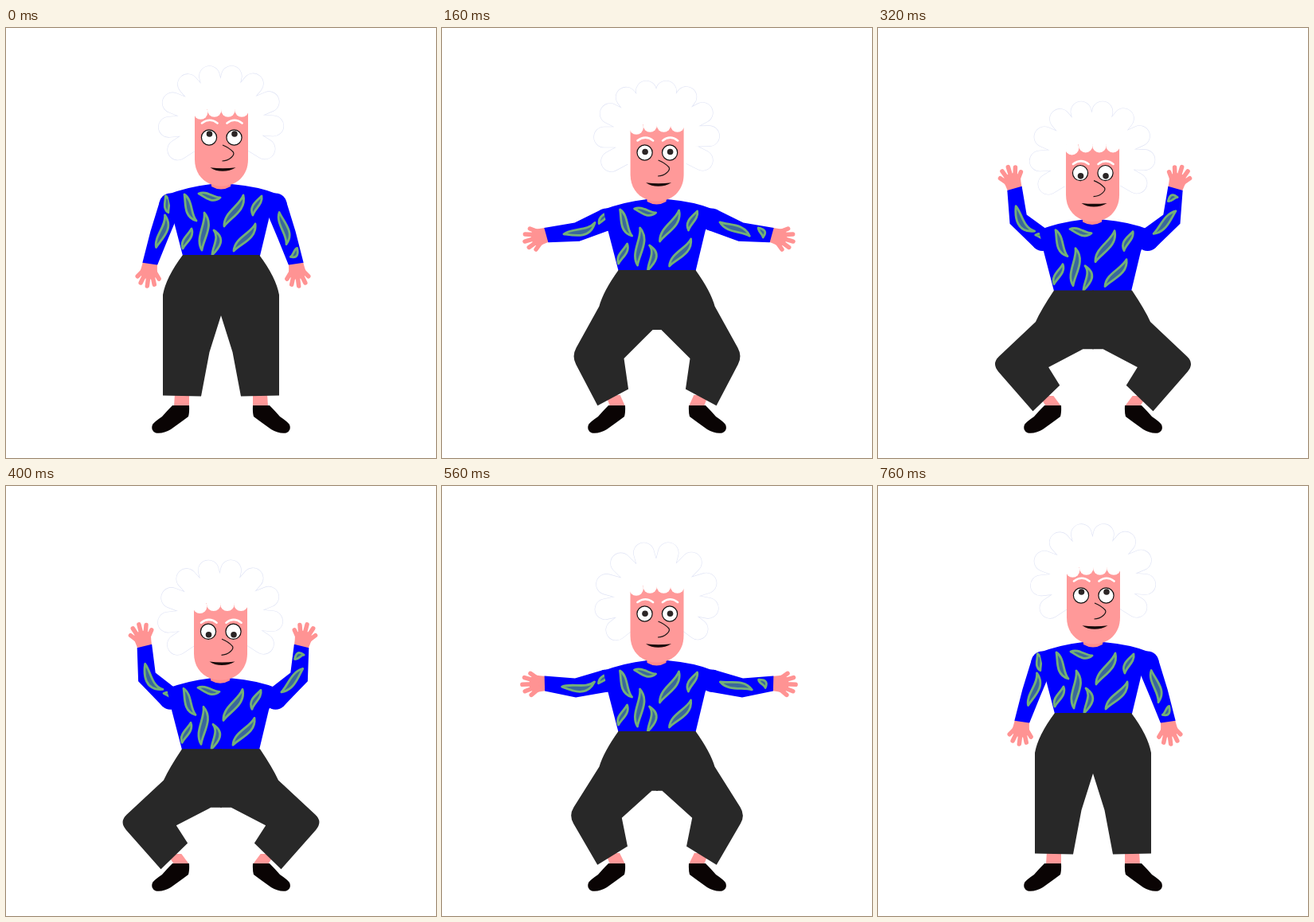
These frames come from a looping animation (540 px wide and 540 px high, 800 ms). An HTML page:

```html
<!DOCTYPE html>
<html lang="en">
<head>
<meta charset="utf-8">
<title>Squat dance</title>
<style>
html, body { margin: 0; width: 100%; height: 100%; overflow: hidden; background: #fff; }
svg { display: block; width: 100%; height: 100%; }
</style>
</head>
<body>
<svg id="stage" viewBox="0 0 540 540">
  <g id="hands" fill="#ff9393" stroke="#ff9393" stroke-linecap="round"></g>
  <g id="arms"></g>
  <g id="torso">
    <path fill="#00f" d="M222 286L209 236L203 209Q230 199 258 196H283Q318 199 342 209L331 236L319 286Z"/>
    <g id="print"></g>
  </g>
  <g id="leg">
    <path id="shin" fill="#ff9999"/>
    <path fill="#0a0404" d="M209 474H230Q230.500 483 229 488Q221 494 207 504Q197 510 188 508.500Q181 505 184 498Q187 494 196 488Q202 481 209 474Z"/>
    <path id="pants" fill="#282828"/>
  </g>
  <use href="#leg" transform="translate(540 0) scale(-1 1)"/>
  <g id="hair" stroke-linecap="round" fill="none"></g>
  <g id="head">
    <path fill="#ff8c8c" d="M258 190H282V199Q270 206 258 199Z"/>
    <path fill="#ff9999" d="M237 97H304V165C304 186 289 198.500 270.500 198.500S237 186 237 165Z"/>
    <g id="fringe" fill="#fff"><path d="M232 88H308V102H232Z"/></g>
    <path id="brows" fill="none" stroke="#fff" stroke-width="2.600" stroke-linecap="round"
      d="M246 119.500Q256 112 265.500 119.500M277.500 119.500Q287 112 296.500 119.500"/>
    <g fill="#fff" stroke="#111" stroke-width="1.200">
      <circle cx="255" cy="137.500" r="9.600"/><circle cx="286.500" cy="137.500" r="9.600"/>
    </g>
    <g id="pupils" fill="#2b2525">
      <circle cx="255.500" cy="137.500" r="3.800"/><circle cx="287" cy="137.500" r="3.800"/>
    </g>
    <path fill="none" stroke="#1c1616" stroke-width="1.200" d="M272 147Q280 150 285.500 156Q287 159 283 162.500Q278 167 271.500 167"/>
    <path fill="#170a0a" d="M256.500 175.300Q272 177 288.500 175.300Q281 179.800 272 179.800Q263 179.800 256.500 175.300Z"/>
  </g>
</svg>
<script>
const LOOP = 800, STEP = 40, LOW = 360, HOME = 760, DROP = 46;
const UPPER = 40, FORE = 39, RAD = Math.PI / 180;
const $ = id => document.getElementById(id);
const mix = (a, b, k) => a + (b - a) * k;
const blend = (a, b, k) => [mix(a[0], b[0], k), mix(a[1], b[1], k)];
const pt = a => a[0].toFixed(2) + ' ' + a[1].toFixed(2);
const poly = list => 'M' + list.map(pt).join('L') + 'Z';
const range = (n, fn) => Array.from({ length: n }, (_, i) => fn(i));
const ease = u => (1 - Math.cos(Math.PI * u)) / 2;

// Squat depth: 0 standing, 1 lowest; the rise lingers at the bottom
function depth(t) {
  t = (t + LOOP) % LOOP;
  if (t < LOW) return ease(t / LOW);
  if (t < 480) return ease(1 - .235 * (t - LOW) / 120);
  if (t < 560) return ease(mix(.765, .5, (t - 480) / 80));
  return ease(Math.max(0, .5 * (HOME - t) / 200));
}

// Leaf from (ax,ay) to (bx,by): an S curve, arched sideways by arc
function leaf([ax, ay, bx, by, arc = 0], map = a => a) {
  const vx = bx - ax, vy = by - ay, len = Math.hypot(vx, vy);
  const width = 2.500 + len * .065, sway = len * .14;
  const at = (k, off) => pt(map([ax + vx * k - vy / len * off, ay + vy * k + vx / len * off]));
  const c1 = arc - sway, c2 = arc + sway;
  return `<path fill="#3a689c" stroke="#74b078" stroke-width="2.8" stroke-linejoin="round" d="M${at(0, 0)}` +
    `C${at(.3, c1 + width)} ${at(.7, c2 + width)} ${at(1, 0)}` +
    `C${at(.7, c2 - width)} ${at(.3, c1 - width)} ${at(0, 0)}Z"/>`;
}

$('print').innerHTML = [
  [224, 209, 239, 242, 3], [242, 208, 269, 213, 2], [298, 210, 274, 249, -2], [321, 211, 310, 235, 2],
  [313, 246, 286, 280, -2], [249, 232, 246, 279, -2], [233, 252, 222, 277], [261, 254, 259, 285, -8]
].map(l => leaf(l)).join('');

$('fringe').innerHTML += range(4, i =>
  `<circle cx="${244.500 + 17.200 * i}" cy="${i ? 103 : 106}" r="8.800"/>`).join('');

// Sleeve leaves: distance from the shoulder, offset outward
const SLEEVE = {
  '-1': [[-8, 9.500, 10.500, -1], [15, 2, 57, -1, -5]],
  '1': [[11, 1, 52, -4, 3], [60, 7.500, 69, -4, 3]]
};

function drawArm(side, p, drop) {
  // Point at a distance along and outward of a limb turned by a degrees
  const go = (o, a, along, out) => {
    const x = Math.sin(a * RAD), y = Math.cos(a * RAD);
    return [o[0] + side * (x * along + y * out), o[1] + y * along - x * out];
  };
  const up = 20 + 114 * p, low = 18 + 160 * p, turn = 8 + 161 * p, bend = (up + low) / 2;
  const S = [272.500 + side * 66, 221.500 + drop], E = go(S, up, UPPER, 0), W = go(E, low, FORE, 0);
  const map = ([x, w]) => {
    const k = (x - UPPER) / FORE;
    return k < 0 ? go(go(S, up, x, 0), mix(up, bend, Math.max(0, x / UPPER)), 0, w)
      : go(blend(E, W, k), mix(bend, turn, k), 0, w);
  };
  const tube = (parts, at) => poly([...parts, ...parts.map(([x, w]) => [x, -w]).reverse()].map(at));
  const grip = ([along, out]) => go(W, turn, along, out);
  const fingers = range(5, i => {
    const a = (37 - 19 * i) * RAD, r = 29 - 1.500 * (i - 2) ** 2;
    const on = k => pt(grip([Math.cos(a) * k, Math.sin(a) * k]));
    return `M${on(10)}L${on(r - 1)}`;
  }).join('');
  $('hands').innerHTML += `<path d="${tube([[-2, 9], [6, 10], [14, 11.500], [19, 5]], grip)}" stroke="none"/>` +
    `<path d="${fingers}" stroke-width="5.500"/>`;
  $('arms').innerHTML += `<circle cx="${S[0]}" cy="${S[1]}" r="14" fill="#00f"/>` +
    `<path d="${tube([[0, 14], [UPPER, 12], [UPPER + FORE, 9.500]], map)}" fill="#00f"/>` +
    SLEEVE[side].map(l => leaf(l, map)).join('');
}

// Left half of the trousers; the knee swings out with the root of the depth
function drawLeg(p, drop) {
  const q = Math.sqrt(p);
  const waist = [222 - p, 285 + drop], hip = [197 + p, 335 - 11 * p + drop];
  const knee = [197 - 49.500 * q - 6 * p, 405 + 17 * p], bend = [255.500 - 42 * q, 407 + 19.500 * p];
  const out = [197 - 2.500 * q, 461.500 + 20 * q], inner = [245 - 17 * q, 462.500 - 14 * q];
  const crotch = [270 - 13 * p, 361 + 43.500 * p];
  $('pants').setAttribute('d', `M271 ${waist[1]}L${pt(waist)}Q${pt([201 + 4 * p, 313 - 4 * p + drop])} ${pt(hip)}` +
    `L${pt(blend(knee, hip, .17))}Q${pt(knee)} ${pt(blend(knee, out, .17))}` +
    'L' + [out, inner, bend, crotch, [271, crotch[1]]].map(pt).join('L') + 'Z');
  const [x, y] = blend(out, inner, .5);
  $('shin').setAttribute('d', poly([[211, 475], [230, 475], [x + 9, y - 3], [x - 9, y - 3]]));
}

// Curls lag behind the body: speed lifts or lowers them
function drawHair(p, drop, speed) {
  const cx = 270 - p, cy = 118 + drop;
  const d = range(10, i => {
    const a = (-123 + 27.200 * i) * RAD, swing = Math.sin(a);
    const r = a - speed * 6 * RAD * swing, far = 57 + 9 * Math.abs(swing);
    const at = k => pt([cx + Math.sin(r) * k, cy - Math.cos(r) * k]);
    return `M${at(25)}L${at(far)}`;
  }).join('');
  $('hair').innerHTML = `<path d="${d}" stroke="#dfe3f5" stroke-width="26.600"/>` +
    `<path d="${d}" stroke="#fff" stroke-width="25.400"/><circle cx="${cx}" cy="${cy}" r="50" fill="#fff"/>`;
}

function draw(t) {
  const p = depth(t), drop = DROP * p;
  const speed = (depth(t + 20) - depth(t - 20)) / 40 / .0044;
  const move = (id, x, y) => $(id).setAttribute('transform', `translate(${x} ${y})`);
  move('torso', -p, drop);
  move('head', -p, drop);
  move('brows', 0, 7 * p);
  move('pupils', 0, -4.500 + 8.500 * p);
  $('hands').innerHTML = $('arms').innerHTML = '';
  drawArm(-1, p, drop);
  drawArm(1, p, drop);
  drawLeg(p, drop);
  drawHair(p, drop, speed);
}

let start = null, last = -1;
function tick(now) {
  if (start === null) start = now;
  const t = Math.floor((now - start) % LOOP / STEP) * STEP;
  if (t !== last) draw(last = t);
  requestAnimationFrame(tick);
}
draw(0);
requestAnimationFrame(tick);
</script>
</body>
</html>
```
